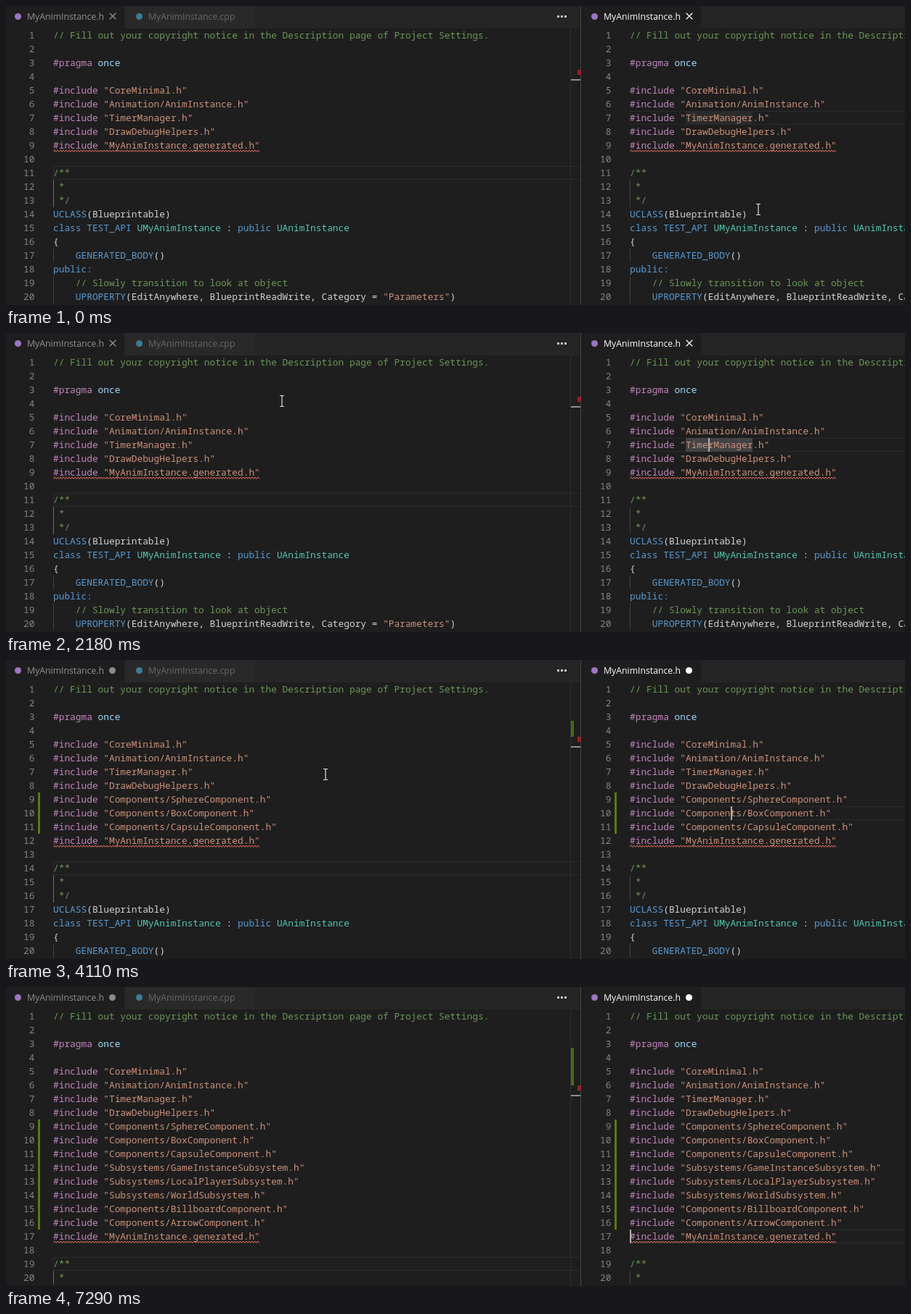
An HTML page that plays this animation: 1238x413 px, repeating every 7.46 s.

```html
<!DOCTYPE html>
<html lang="en">
<head>
<meta charset="utf-8">
<title>Adding includes from a picker</title>
<style>
html, body { margin: 0; width: 100%; height: 100%; overflow: hidden; background: #1e1e1e; }
#stage { position: relative; width: 1238px; height: 413px; overflow: hidden; background: #1e1e1e;
  font: 12.27px/29px "Open Sans", "Noto Sans", sans-serif; }
#stage div, #stage svg, #stage i { position: absolute; }
.pane { top: 0; height: 413px; overflow: hidden; }
#left { left: 0; width: 791px; }
#right { left: 794px; width: 444px; }
.code { left: 0; top: 0; width: 100%; height: 100%;
  font: 12.83px/19px "Noto Sans Mono", "DejaVu Sans Mono", monospace; color: #d4d4d4; white-space: pre; }
.row { left: 0; width: 100%; height: 19px; }
.num { left: 0; width: 39.5px; text-align: right; color: #858585; }
.txt { left: 65px; }
.guide { left: 65px; width: 1px; height: 19px; background: #404040; }
#left .doc .guide { background: #707070; }
.added { left: 44px; width: 3px; height: 19px; background: #587c0c; }
.current { left: 65px; right: 0; height: 17px; border: 1px solid #2b2b2b; border-right: 0; }
.word { left: 142px; top: 145px; width: 92.4px; height: 19px; }
.caret { width: 2px; height: 19px; background: #aeafad; }
.wave { left: 65px; top: 15px; fill: none; stroke: #e8735f; }
.c { color: #6a9955; } .p { color: #c586c0; } .s { color: #ce9178; }
.k { color: #569cd6; } .t { color: #4ec9b0; } .v { color: #9cdcfe; }
.bar { left: 0; top: 0; width: 1238px; height: 31px; background: #252526; }
.tab { top: 0; height: 31px; white-space: pre; }
.tab span { position: absolute; top: 0; }
.icon { top: 10px; width: 9px; height: 9px; border-radius: 50%; }
.close { top: 9px; fill: none; stroke-width: 1.3; }
.dot { top: 10px; width: 9px; height: 9px; border-radius: 50%; }
#more { left: 759px; top: 13px; width: 3px; height: 3px; background: #c5c5c5;
  box-shadow: 5px 0 #c5c5c5, 10px 0 #c5c5c5; }
#ruler { left: 777px; top: 31px; width: 1px; height: 382px; background: #303030; }
#split { left: 791px; top: 0; width: 1px; height: 413px; background: #444; }
#green { left: 778px; top: 84px; width: 4px; background: #4b6a14; }
#red { left: 787px; width: 4px; height: 7px; background: #b81414; }
#gray { left: 778px; width: 13px; height: 2px; background: #8f8f8f; }
#popup { left: 323px; top: 0; width: 600px; height: 217px; background: #252526; color: #ccc;
  box-shadow: 0 5px 8px #000; }
#input { left: 6px; top: 2px; width: 586px; height: 25px; border: 1px solid #0e5a8c; background: #3c3c3c; }
#blink { left: 11px; top: 7px; width: 1px; height: 17px; background: #ddd; }
.item { left: 0; width: 589px; height: 22px; padding-left: 11px; line-height: 21px; }
.hover { background: #2a2d2e; }
.item:nth-of-type(3) { background: #062f4a; color: #fff; }
#mouse { left: 0; top: 0; width: 0; height: 0; }
#click { left: -12px; top: -12px; width: 24px; height: 24px; border-radius: 50%; background: #c5b41c; opacity: .88; }
#beam { left: -5px; top: -9px; }
#hand { left: -6px; top: -2px; }
</style>
</head>
<body>
<div id="stage">
  <div class="bar"></div>
  <div class="tab" style="left:0;width:163px;background:#1e1e1e;color:#929292">
    <i class="icon" style="left:12px;background:#a074c4"></i><span style="left:29px">MyAnimInstance.h</span>
    <svg class="close" style="left:142px" width="10" height="10" stroke="#929292"><path d="M.7 .7l8.6 8.6M9.3 .7L.7 9.3"/></svg>
    <i class="dot" style="left:142px;background:#8c8c8c"></i>
  </div>
  <div class="tab" style="left:164px;width:179px;background:#292929;color:#696969">
    <i class="icon" style="left:15px;background:#397d98"></i><span style="left:32px">MyAnimInstance.cpp</span>
  </div>
  <div id="more"></div>
  <div class="tab" style="left:792px;width:165px;background:#1e1e1e;color:#fff">
    <i class="icon" style="left:14px;background:#a074c4"></i><span style="left:31px">MyAnimInstance.h</span>
    <svg class="close" style="left:144px" width="10" height="10" stroke="#fff"><path d="M.7 .7l8.6 8.6M9.3 .7L.7 9.3"/></svg>
    <i class="dot" style="left:144px;background:#fff"></i>
  </div>
  <div id="left" class="pane">
    <div class="current"></div><div class="code"></div>
  </div>
  <div id="right" class="pane">
    <div class="current"></div><div class="word"></div><div class="code"></div><div class="caret"></div>
  </div>
  <div id="ruler"></div><div id="green"></div><div id="red"></div><div id="gray"></div><div id="split"></div>
  <div id="popup"><div id="input"></div><div id="blink"></div></div>
  <div id="mouse">
    <div id="click"></div>
    <svg id="beam" width="10" height="18" fill="none">
      <path d="M2 1.5h2.2l.8.8.8-.8H8M5 2v14M2 16.5h2.2l.8-.8.8.8H8" stroke="#111" stroke-width="2.4" opacity=".5"/>
      <path d="M2 1.5h2.2l.8.8.8-.8H8M5 2v14M2 16.5h2.2l.8-.8.8.8H8" stroke="#e8e8e8" stroke-width="1.2"/>
    </svg>
    <svg id="hand" width="18" height="25">
      <path d="M4 3.5a1.7 1.7 0 0 1 3.4 0V9l6 1.2q2 .5 2 2.3V16l-1.6 4v3H5.5v-2L1.2 15Q0 13 1.2 12.2 2.4 11.6 4 13.6Z"
        fill="#fff" stroke="#111"/>
    </svg>
  </div>
</div>
<script>
const LOOP = 7460, STEP = 77.5, ROW = 19, CHAR = 7.698;
const $ = s => document.querySelector(s), all = s => document.querySelectorAll(s);
const show = (el, on) => { el.style.visibility = on ? 'visible' : 'hidden'; };
const rowTop = n => 31 + ROW * (n - 1);

const head = `// Fill out your copyright notice in the Description page of Project Settings.

#pragma once

#include "CoreMinimal.h"
#include "Animation/AnimInstance.h"
#include "TimerManager.h"
#include "DrawDebugHelpers.h"`.split('\n');
const extra = ['Components/SphereComponent', 'Components/BoxComponent', 'Components/CapsuleComponent',
  'Subsystems/GameInstanceSubsystem', 'Subsystems/LocalPlayerSubsystem', 'Subsystems/WorldSubsystem',
  'Components/BillboardComponent', 'Components/ArrowComponent'].map(s => `#include "${s}.h"`);
const tail = `#include "MyAnimInstance.generated.h"

/**
 *
 */
UCLASS(Blueprintable)
class TEST_API UMyAnimInstance : public UAnimInstance
{
    GENERATED_BODY()
public:
    // Slowly transition to look at object
    UPROPERTY(EditAnywhere, BlueprintReadWrite, Category = "Parameters")`.split('\n');
const items = ['AIPerception', 'Math', 'PrimitiveShapes', 'Procedural', 'Spline', 'Subsystems', 'Visualization', 'Data'];

const token = /("[^"]*")|(#\w+)|\b(UCLASS|UPROPERTY|GENERATED_BODY|class|public:?|TEST_API)|\b(U\w*AnimInstance)|\b(once)/g;
function paint(line) {
  if (/^\s*(\/\/|\/\*|\*)/.test(line)) return `<span class="c">${line}</span>`;
  return line.replace(token, (m, ...g) => `<span class="${'spktv'[g.findIndex(Boolean)]}">${m}</span>`);
}
const wave = `<svg class="wave" width="286" height="5"><path d="M0 3.5${'l2 -2.5l2 2.5'.repeat(71)}"/></svg>`;

function rowHtml(line, i, added) {
  const n = i + 1, isDoc = /^ \*/.test(line);
  return `<div class="row${isDoc ? ' doc' : ''}" style="top:${rowTop(n)}px"><div class="num">${n}</div>` +
    (n > 8 && n <= 8 + added ? '<div class="added"></div>' : '') +
    (/^ /.test(line) ? '<div class="guide"></div>' : '') +
    `<div class="txt">${paint(line)}</div>${line.includes('generated') ? wave : ''}</div>`;
}

items.forEach((name, i) => {
  const el = document.createElement('div');
  el.className = 'item';
  el.style.top = 36 + 22 * i + 'px';
  el.textContent = name;
  $('#popup').append(el);
});
const itemEls = all('.item');

let shown = -1;
function setDoc(added) {
  if (added === shown) return;
  shown = added;
  const lines = [...head, ...extra.slice(0, added), ...tail].slice(0, 20);
  const html = lines.map((l, i) => rowHtml(l, i, added)).join('');
  all('.code').forEach(el => { el.innerHTML = html; });
  $('#left .current').style.top = rowTop(11 + added) + 'px';
  all('.close').forEach(el => show(el, !added));
  all('.dot').forEach(el => show(el, added));
}

// time, x, y of the pointer's hot spot
const path = [[60, 1036, 281], [470, 967, 157], [1200, 967, 157], [1480, 333, 84], [1790, 380, 94], [2200, 380, 94],
  [2730, 998, 212], [2960, 998, 212], [3030, 1001, 215], [3420, 1001, 215], [3650, 468, 167], [3720, 468, 167],
  [3870, 440, 158], [4200, 440, 158], [4720, 955, 245], [4960, 955, 245], [5190, 996, 232], [5260, 996, 232],
  [5330, 999, 233], [5500, 999, 233], [5820, 387, 186], [5980, 387, 186], [6050, 386, 177], [6370, 386, 177],
  [6450, 430, 440]];
const popups = [[940, 2020, 1010], [3340, 4040, 3340], [5570, 6370, 5570]];
const clicks = [470, 1790, 2800, 3870, 5190, 6220];
const inserts = [[0, 0], [2330, 3], [4260, 6], [6450, 8]];
const rulers = [[0, 0], [2650, 3], [4640, 6], [7220, 8]];
const currents = [[0, 7], [2330, 12], [2800, 10], [4260, 15], [5190, 11], [6450, 17]];
// from, to, column
const carets = [[470, 940, 14], [2020, 2330, 14], [2330, 2650, 0], [2800, 3340, 18], [4040, 4260, 18],
  [4260, 4640, 0], [5190, 5570, 18], [6450, 6830, 0], [7290, LOOP, 0]];

const latest = (list, t) => list.filter(k => k[0] <= t).pop()[1];
const span = (list, t) => list.find(k => t >= k[0] && t < k[1]);

function pointer(t) {
  t = Math.floor((t + 10) / STEP) * STEP + 10;
  const i = path.findIndex(k => k[0] > t);
  if (i < 0) return path[path.length - 1].slice(1);
  if (!i) return path[0].slice(1);
  const a = path[i - 1], b = path[i], u = (t - a[0]) / (b[0] - a[0]), e = u * u * (3 - 2 * u);
  return [1, 2].map(j => Math.round(a[j] + (b[j] - a[j]) * e));
}

function draw(t) {
  setDoc(latest(inserts, t));

  const line = latest(currents, t), caret = span(carets, t), caretEl = $('.caret');
  $('#right .current').style.top = rowTop(line) + 'px';
  show(caretEl, caret);
  if (caret) {
    caretEl.style.left = Math.round(65 + caret[2] * CHAR) + 'px';
    caretEl.style.top = rowTop(line) + 'px';
  }
  show($('.word'), t < 2330);
  $('.word').style.background = caret ? '#414345' : '#2b2b2b';

  const n = latest(rulers, t);
  $('#green').style.height = (n ? 4 + 6 * n : 0) + 'px';
  $('#red').style.top = 88 + 6 * n + 'px';
  $('#gray').style.top = 101 + 6 * n + 'px';

  const [x, y] = pointer(t), popup = span(popups, t);
  const inList = popup && x > 323 && x < 923 && y >= 36 && y < 217;
  $('#popup').style.display = popup ? 'block' : 'none';
  if (popup) {
    const age = t - popup[2], focused = t < 6220;
    $('#blink').style.opacity = focused && age >= 0 && age % 960 < 480 ? 1 : 0;
    $('#input').style.borderColor = focused ? '#0e5a8c' : '#3c3c3c';
    const over = inList ? Math.floor((y - 36) / 22) : -1;
    itemEls.forEach((el, i) => el.classList.toggle('hover', i === over));
  }

  $('#mouse').style.transform = `translate(${x}px,${y}px)`;
  show($('#hand'), inList);
  show($('#beam'), !inList);
  show($('#click'), clicks.some(c => t >= c && t < c + 75));
}

const start = performance.now();
function tick() {
  draw((performance.now() - start) % LOOP);
  requestAnimationFrame(tick);
}
tick();
</script>
</body>
</html>
```
